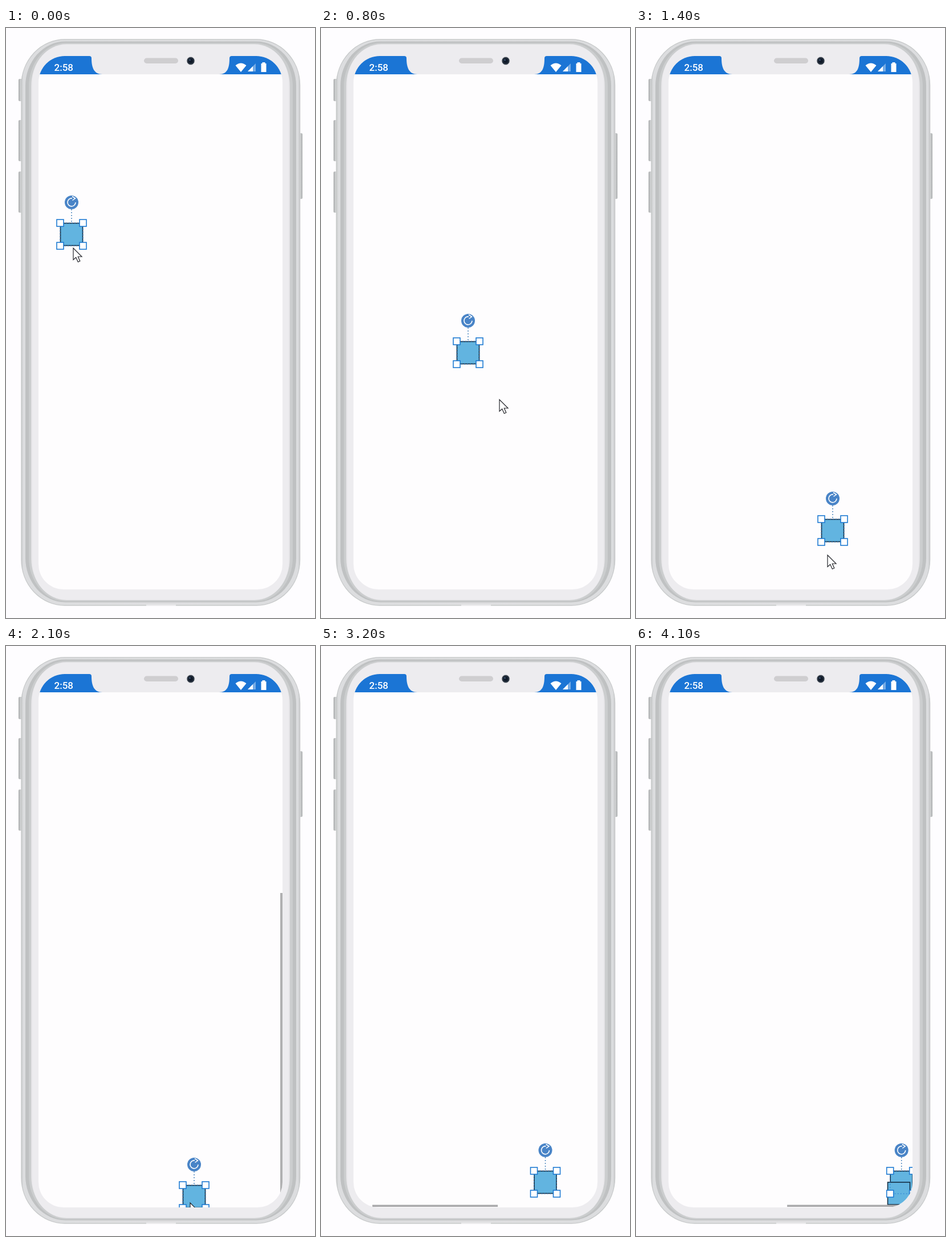
An HTML page that plays this animation: 542 by 1032 pixels, repeating every 4.2 s.

```html
<!DOCTYPE html>
<html lang="en">
<head>
<meta charset="utf-8">
<title>Drag and auto scroll</title>
<style>
  html, body { margin: 0; width: 100%; height: 100%; overflow: hidden; background: #fefdff; }
  svg { display: block; width: 100%; height: 100%; }
  text { font: 500 17px Roboto, "Noto Sans", sans-serif; fill: #fff; }
</style>
</head>
<body>
<svg viewBox="0 0 542 1032">
  <defs>
    <linearGradient id="rim">
      <stop offset="0" stop-color="#c6c8c9"/>
      <stop offset=".007" stop-color="#dcdddf"/>
      <stop offset=".5" stop-color="#dedee0"/>
      <stop offset=".993" stop-color="#dcdddf"/>
      <stop offset="1" stop-color="#c6c8c9"/>
    </linearGradient>
    <linearGradient id="key">
      <stop offset="0" stop-color="#a6a8a9"/>
      <stop offset=".5" stop-color="#cfd1d2"/>
      <stop offset="1" stop-color="#a9abac"/>
    </linearGradient>
    <clipPath id="screen">
      <path d="M103 49H439A46 46 0 0 1 485 95V938A44 44 0 0 1 441 982H101A44 44 0 0 1 57 938V95A46 46 0 0 1 103 49Z"/>
    </clipPath>
  </defs>

  <!-- phone body -->
  <g fill="url(#key)">
    <rect x="22" y="89" width="7" height="39" rx="2"/>
    <rect x="22" y="161" width="7" height="72" rx="2"/>
    <rect x="22" y="251" width="7" height="72" rx="2"/>
    <rect x="513" y="184" width="7" height="115" rx="2"/>
  </g>
  <rect x="27" y="20" width="488.500" height="990" rx="76" ry="80" fill="url(#rim)" stroke="#c9cbcc" stroke-width="1.500"/>
  <rect x="34" y="23.500" width="475" height="981" rx="70" ry="78" fill="#bfc1c2"/>
  <rect x="40" y="26" width="463" height="977" rx="65" ry="76" fill="#cbcdce"/>
  <rect x="44" y="28" width="454" height="973" rx="62" ry="74" fill="#e4e3e6"/>
  <rect x="46" y="29" width="450" height="971" rx="60" ry="66" fill="#edecef"/>
  <rect x="246" y="1008.500" width="52" height="2.500" fill="#ececee"/>

  <!-- screen -->
  <g clip-path="url(#screen)">
    <rect x="57" y="49" width="428" height="933" fill="#fefdfe"/>
    <rect x="57" y="49" width="428" height="32" fill="#1b75d5"/>
    <path d="M146 49Q150 49 150 53C150 70 155 81 169 81H374C388 81 392 70 392 53Q392 49 396 49Z" fill="#edecef"/>
    <text x="84.500" y="75">2:58</text>
    <g fill="#fff">
      <path d="M402.500 65.500Q412 57.500 421.500 65.500L412 77Z"/>
      <path d="M438 62V76H424Z" opacity=".4"/>
      <path d="M433 67V76H424Z"/>
      <path d="M449.500 60H454.500V62H456.500V77H447.500V62H449.500Z"/>
    </g>
    <g id="shapes">
      <rect id="node" class="box"/>
      <rect id="drop" class="box"/>
    </g>
    <g id="selector">
      <path d="M0 -44V-20" stroke="#4d86bd" stroke-width="1.500" stroke-dasharray="2 3"/>
      <rect x="-20" y="-20" width="40" height="40" fill="none" stroke="#2b7fd0" stroke-dasharray="2 3"/>
      <circle cy="-56" r="12" fill="#4984c7"/>
      <path d="M7 -56A7 7 0 1 1 1 -63" fill="none" stroke="#fff" stroke-width="1.600"/>
      <path d="M1 -66.500L6.500 -63L1.500 -59.500" fill="none" stroke="#fff" stroke-width="1.500"/>
      <g id="handles" fill="#fff" stroke="#1f7bd3" stroke-width="1.600"></g>
    </g>
    <rect id="vbar" x="481" width="4" fill="#b0b0b1"/>
    <rect id="hbar" y="977.500" height="3.500" fill="#a9a9ab"/>
    <path id="cursor" d="M0 0V20.500L4.700 16.300L8.300 24.300L11.800 22.700L8.300 15H15Z" fill="#fff" stroke="#24252b" stroke-width="1.200"/>
  </g>

  <!-- speaker and camera -->
  <rect x="242" y="52.500" width="60" height="9.500" rx="4.750" fill="#cfced0"/>
  <circle cx="324" cy="57.500" r="7" fill="#26303d" stroke="#c9cacd"/>
  <circle cx="324" cy="57.500" r="4" fill="#101a29"/>
  <circle cx="322.500" cy="56" r="1.300" fill="#40597a"/>
</svg>
<script>
const LOOP = 4200, STEP = 100, LAG = 100;
const GRAB = [3, 24];
const DRAG_END = 1500;

// time, x, y
const pointer = [
  [0, 118, 385], [300, 118, 386], [400, 124, 397], [500, 152, 437],
  [600, 205, 514], [700, 261, 592], [800, 313, 650], [900, 366, 692],
  [1000, 408, 727], [1100, 406, 761], [1200, 361, 814], [1300, 348, 903],
  [1400, 336, 922], [1600, 329, 950], [2100, 323, 974], [2400, 328, 990]
];
const held = [
  [1500, 333, 898], [1800, 331, 940], [2100, 330, 963], [2500, 332, 960],
  [2800, 350, 944], [3000, 376, 938], [3200, 393.500, 938], [4100, 465.700, 938]
];
const barTop = [[1600, 90], [2100, 432], [2500, 500]];

const el = id => document.getElementById(id);
const clamp = v => Math.max(0, Math.min(1, v));

function set(node, attrs) {
  for (const k in attrs) node.setAttribute(k, attrs[k]);
}

function track(keys, t) {
  let i = 1;
  while (i < keys.length - 1 && t > keys[i][0]) i++;
  const a = keys[i - 1], b = keys[i];
  const k = clamp((t - a[0]) / (b[0] - a[0]));
  return a.slice(1).map((v, j) => v + (b[j + 1] - v) * k);
}

function squareAt(t) {
  if (t >= DRAG_END) return track(held, t);
  return track(pointer, t - LAG).map((v, i) => v - GRAB[i]);
}

const move = (id, [x, y]) => set(el(id), { transform: `translate(${x} ${y})` });

function draw(t) {
  const place = squareAt(t);
  move("node", place);
  move("selector", place);
  move("drop", [461, 957.500]);
  move("cursor", track(pointer, t));

  const [top] = track(barTop, t);
  const left = 57 + Math.max(0, t - 3030) * 0.1945;
  set(el("drop"), { opacity: t >= 4100 ? 1 : 0 });
  set(el("cursor"), { opacity: t < 2400 ? 1 : 0 });
  set(el("vbar"), { y: top, height: 982 - top, opacity: t < 1600 ? 0 : clamp((3100 - t) / 300) });
  set(el("hbar"), { x: left, width: 220, opacity: t >= 3000 ? 1 : 0 });
}

for (const box of document.querySelectorAll(".box")) {
  set(box, { x: -19.5, y: -19.5, width: 39, height: 39, fill: "#62b4e0", stroke: "#142d42", "stroke-width": 1.6 });
}
for (const [x, y] of [[-20, -20], [20, -20], [-20, 20], [20, 20]]) {
  const grip = document.createElementNS("http://www.w3.org/2000/svg", "rect");
  set(grip, { x: x - 6, y: y - 6, width: 12, height: 12 });
  el("handles").append(grip);
}

function tick(now) {
  draw(Math.floor(((now + 8) % LOOP) / STEP) * STEP);
  requestAnimationFrame(tick);
}
draw(0);
requestAnimationFrame(tick);
</script>
</body>
</html>
```
